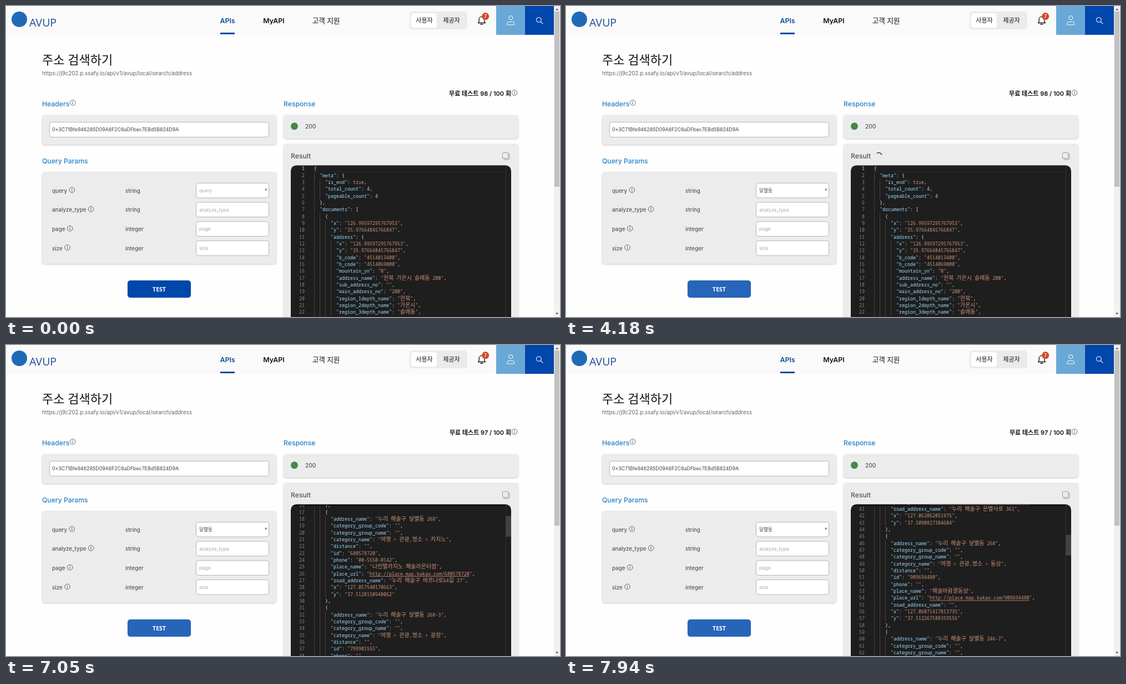
An HTML page with a canvas for the animation above (8.01 s loop, 998x561 px).

```html
<!DOCTYPE html>
<html lang="ko">
<head>
<meta charset="utf-8">
<title>주소 검색하기</title>
<style>
html, body { margin: 0; width: 100%; height: 100%; overflow: hidden; background: #fefefe; }
canvas { display: block; width: 998px; height: 561px; }
</style>
</head>
<body>
<canvas id="stage"></canvas>
<script>
const W = 998, H = 561, LOOP = 8010;
const canvas = document.getElementById('stage');
const dpr = window.devicePixelRatio || 1;
canvas.width = W * dpr;
canvas.height = H * dpr;
const c = canvas.getContext('2d');

const UI = "Inter, 'Noto Sans CJK KR', sans-serif";
const BOLD = "'Open Sans', 'Noto Sans', sans-serif";
const MONO = "8.33px 'Noto Sans Mono', monospace";
const HANGUL = "300 10px 'Noto Sans CJK KR', sans-serif";
const BLUE = '#0047ab';

// Timeline (ms)
const FOCUS = 860, HOVER = 2870, CLICK = 3180, ENTER = 5600, LOADED = 5990, LINKS = 6700;
const KEYS = [[1260, 'ㄷ'], [1400, '다'], [1470, '달'], [1670, '달ㅂ'], [1740, '달벼'],
  [1800, '달별'], [1870, '달별ㄷ'], [1990, '달별도'], [2080, '달별동']];
// Scroll position as [time, px], repainted every STEP ms
const SCROLL = [[6568, 0], [6636, 41.7], [7316, 287.2], [7384, 327], [7452, 327], [7928, 490.6]];
const STEP = 68;
const LINE = 12.33, TOP = 287.4;

const oldJson = {
  meta: { is_end: true, total_count: 4, pageable_count: 4 },
  documents: [{
    x: '126.99597295767953',
    y: '35.97664845766847',
    address: {
      x: '126.99597295767953',
      y: '35.97664845766847',
      b_code: '4514013400',
      h_code: '4514069000',
      mountain_yn: 'N',
      address_name: '한북 가온시 솔메동 200',
      sub_address_no: '',
      main_address_no: '200',
      region_1depth_name: '한북',
      region_2depth_name: '가온시',
      region_3depth_name: '솔메동',
      region_3depth_h_name: ''
    }
  }]
};

const place = (lot, kind, id, phone, name, road, x, y) => ({
  address_name: '누리 해솔구 달별동 ' + lot,
  category_group_code: '',
  category_group_name: '',
  category_name: '여행 > 관광,명소 > ' + kind,
  distance: '',
  id,
  phone,
  place_name: name,
  place_url: 'http://place.map.kakao.com/' + id,
  road_address_name: road && '누리 해솔구 ' + road,
  x, y
});
const newJson = {
  documents: [
    place('242', '문화유적 > 릉,묘,총', '26967382', '00-555-0187', '누리솔릉과별릉',
      '솔릉로200길 3', '127.04892851392', '37.5091105328378'),
    place('268', '카지노', '680578720', '00-5550-0142', '나인별카지노 해솔라온터점',
      '바르나로64길 27', '127.057540170663', '37.5120150940062'),
    place('268-3', '광장', '799901555', '', '라온터 동문광장',
      '은별사로 361', '127.062062051975', '37.5090827384604'),
    place('268', '동상', '909694480', '', '해솔바람결동상',
      '', '127.06071417813735', '37.512267588359556'),
    place('246-7', '', '', '', '', '', '', '')
  ]
};
const toLines = o => JSON.stringify(o, null, 2).split('\n');
const oldLines = toLines(oldJson), newLines = toLines(newJson);

const clamp = v => Math.max(0, Math.min(1, v));
const smooth = v => { v = clamp(v); return v * v * (3 - 2 * v); };
const mix = (a, b, k) => 'rgb(' + a.map((v, i) => Math.round(v + (b[i] - v) * k)) + ')';

function scrollAt(t) {
  const start = SCROLL[0][0];
  const held = start + Math.floor((t - start) / STEP) * STEP;
  let pos = 0;
  for (let i = 1; i < SCROLL.length; i++) {
    const [t0, a] = SCROLL[i - 1], [t1, b] = SCROLL[i];
    pos += (b - a) * clamp((held - t0) / (t1 - t0));
  }
  return pos;
}

function rect(x, y, w, h, fill) {
  c.fillStyle = fill;
  c.fillRect(x, y, w, h);
}
function box(x, y, w, h, r, fill, stroke) {
  c.beginPath();
  c.roundRect(x, y, w, h, r);
  if (fill) { c.fillStyle = fill; c.fill(); }
  if (stroke) { c.strokeStyle = stroke; c.lineWidth = 1; c.stroke(); }
}
function disc(x, y, r, fill) {
  c.beginPath();
  c.arc(x, y, r, 0, 7);
  c.fillStyle = fill;
  c.fill();
}
function stroke(d, color, w) {
  c.strokeStyle = color;
  c.lineWidth = w;
  c.stroke(new Path2D(d));
}
function text(s, x, y, size, color, weight = 400, align = 'left', family = UI) {
  c.font = `${weight} ${size}px ${family}`;
  c.fillStyle = color;
  c.textAlign = align;
  c.fillText(s, x, y);
  return c.measureText(s).width;
}
function card(x, y, w, h) {
  c.save();
  c.shadowColor = 'rgba(0,0,0,.2)';
  c.shadowBlur = 3 * dpr;
  c.shadowOffsetY = 1.3 * dpr;
  box(x, y, w, h, 5, '#ececec');
  c.restore();
}
function info(x, y) {
  c.beginPath();
  c.arc(x, y, 4.8, 0, 7);
  c.strokeStyle = '#47566a';
  c.lineWidth = 0.9;
  c.stroke();
  rect(x - 0.5, y - 0.8, 1, 3.4, '#47566a');
  rect(x - 0.5, y - 2.7, 1, 1.1, '#47566a');
}

function header() {
  rect(0, 0, 987, 52, '#fafafa');
  disc(24, 24, 14, '#1f6ab8');
  text('AVUP', 42, 37, 19.5, '#1c4f9c', 400, 'left', BOLD);
  text('APIs', 399, 31, 12.4, '#0b4a9e', 600, 'center');
  rect(386, 48, 26, 3, '#0b4a9e');
  text('MyAPI', 482.5, 31, 12.4, '#111', 600, 'center');
  text('고객 지원', 576.5, 31, 12.6, '#111', 500, 'center');

  box(727, 10, 104, 32, 5, '#ebebeb');
  box(730, 13, 46, 26, 4, '#fff');
  text('사용자', 753.5, 29.8, 11.1, '#111', 500, 'center');
  text('제공자', 802.5, 29.8, 11.1, '#111', 500, 'center');

  c.lineJoin = c.lineCap = 'round';
  stroke('M850.5 30.5H863.5L861.8 28V24A4.8 4.8 0 0 0 852.2 24V28ZM855 33H859', '#111', 1.3);
  disc(863.7, 18.6, 6.5, '#d5482f');
  text('7', 863.7, 21.6, 8.4, '#fff', 500, 'center');

  rect(883, 0, 52, 52, '#69a7d6');
  stroke('M905.6 21.2a3.6 3.6 0 1 0 7.2 0a3.6 3.6 0 1 0 -7.2 0M902.8 33.5V31.5A3 3 0 0 1 905.8 28.5H912.6A3 3 0 0 1 915.6 31.5V33.5Z', '#fff', 1);
  rect(935, 0, 52, 52, BLUE);
  stroke('M955.5 25a4.3 4.3 0 1 0 8.6 0a4.3 4.3 0 1 0 -8.6 0M963 28.3L967 32.2', '#fff', 1.1);
  c.lineJoin = 'miter';
  c.lineCap = 'butt';

  rect(987, 0, 11, H, '#f1f1f1');
  rect(988, 10, 9, 316, '#c1c1c1');
  c.fillStyle = '#555';
  c.fill(new Path2D('M990 7.5L992.6 4.2L995.2 7.5ZM990 553.5L992.6 556.8L995.2 553.5Z'));
}

function field(y, hint, value, border = '#b5b5b5') {
  box(342.5, y + 0.5, 131, 26.5, 4, '#fff', border);
  return text(value || hint, 348, y + 16.9, 8.67, value ? '#444' : '#aaa');
}

function form(t) {
  text('주소 검색하기', 65, 105.3, 22, '#111', 500);
  text('https://j9c202.p.ssafy.io/api/v1/avup/local/search/address', 65, 124.6, 9.8, '#666');
  text(`무료 테스트 ${t < LOADED ? 98 : 97} / 100 회`, 910, 162.2, 11, '#111', 600, 'right');
  info(916, 156.5);

  const label = '#2382cb';
  text('Headers', 65, 181.4, 12.2, label, 500);
  info(120.3, 174.5);
  card(65, 196.5, 422, 53.5);
  box(78.5, 209.5, 395, 27, 4, '#fff', '#b5b5b5');
  text('0×3C71Bfe946285D09A8F2C6aDFbec7EBd5B824D9A', 83, 226.2, 8.8, '#444');

  text('Query Params', 65, 283.8, 12.2, label, 500);
  card(65, 299, 422, 166);
  const rows = [['query', 'string', 118.8], ['analyze_type', 'string', 153],
    ['page', 'integer', 115.2], ['size', 'integer', 110.5]];
  const typed = KEYS.filter(k => t >= k[0]).pop();
  const value = typed ? typed[1] : '';
  const glow = smooth((t - FOCUS) / 150) * (1 - smooth((t - CLICK) / 150));
  rows.forEach(([name, type, ix], i) => {
    const y = 319 + i * 34.7;
    text(name, 83, y + 17.6, 9.75, '#555', 500);
    info(ix, y + 12.8);
    text(type, 215, y + 17.6, 9.75, '#555', 500);
    const w = field(y, name, i ? '' : value,
      i ? undefined : mix([181, 181, 181], [88, 172, 224], glow));
    if (i) return;
    text('*', 465.5, y + 18.2, 10.5, '#d8432b', 500);
    const since = t - (typed ? typed[0] : FOCUS);
    if (t >= FOCUS && t < CLICK && since % 1120 < 560)
      rect(Math.round(348 + (value ? w : 0)), 328, 1, 10, '#222');
  });

  c.save();
  c.shadowColor = 'rgba(0,0,0,.2)';
  c.shadowBlur = 2 * dpr;
  c.shadowOffsetY = dpr;
  box(219, 495, 114, 31, 5, mix([0, 71, 171], [38, 101, 186], smooth((t - HOVER) / 250)));
  c.restore();
  text('TEST', 276, 514.8, 10.5, '#fff', 700, 'center', BOLD);

  text('Response', 500, 181.4, 12.2, label, 500);
  card(500, 196.5, 423, 42.5);
  disc(519.5, 216.8, 6.5, '#418a49');
  text('200', 539, 220.6, 10.2, '#555', 500);
}

function code(s, x, y, color) {
  c.fillStyle = color;
  for (const run of s.match(/[가-힣]+|[^가-힣]+/g)) {
    c.font = run >= '가' ? HANGUL : MONO;
    c.fillText(run, x, y);
    x += c.measureText(run).width;
  }
  return x;
}

function codeLine(s, y, links) {
  const indent = s.search(/\S/);
  for (let i = 0; i < indent; i += 2) rect(555 + i * 5, y, 1, LINE, '#404040');
  let x = 555 + indent * 5;
  for (const tok of s.trim().match(/"[^"]*":?|[\w.]+|[^\w"]+/g)) {
    const base = y + 9;
    if (tok.endsWith('":')) {
      x = code(tok.slice(0, -1), x, base, '#9cdcfe');
      x = code(':', x, base, '#dcdcdc');
    } else {
      const color = /^["t]/.test(tok) ? '#ce9178' : /^\d/.test(tok) ? '#b5cea8' : '#dcdcdc';
      const start = x;
      x = code(tok, x, base, color);
      if (links && tok.startsWith('"http')) rect(start + 5, base + 1.3, x - start - 10, 0.8, color);
    }
  }
}

function result(t) {
  card(500, 248.5, 423, 330);
  text('Result', 513, 275, 12.2, '#555', 500);
  box(896.5, 266.5, 10.5, 10.5, 2, null, '#999');
  box(894.5, 264.5, 10.5, 10.5, 2, '#ececec', '#999');

  if (t >= CLICK && t < LOADED) {
    const mid = (276 + (t - 5900) * 0.36 - 90) * Math.PI / 180;
    c.beginPath();
    c.arc(563.2, 270.6, 6, mid - 0.94, mid + 0.94);
    c.strokeStyle = '#222';
    c.lineWidth = 1.3;
    c.stroke();
  }

  const loaded = t >= LOADED;
  const lines = loaded ? newLines : oldLines;
  const scroll = scrollAt(t);

  c.save();
  c.beginPath();
  c.roundRect(513, 287.4, 397, 300, 10);
  c.clip();
  rect(513, 287, 397, 275, '#1e1e1e');
  c.strokeStyle = '#2c2c2c';
  c.lineWidth = 1;
  c.strokeRect(555.5, TOP - scroll + 0.5, 345, LINE - 1);
  lines.forEach((s, i) => {
    const y = TOP + i * LINE - scroll;
    if (y < TOP - LINE || y > H) return;
    c.font = MONO;
    c.textAlign = 'right';
    c.fillStyle = i ? '#858585' : '#c6c6c6';
    c.fillText(i + 1, 538, y + 9);
    c.textAlign = 'left';
    codeLine(s, y, t >= LINKS);
  });
  if (scroll > 0) {
    const g = c.createLinearGradient(0, TOP, 0, TOP + 4);
    g.addColorStop(0, 'rgba(0,0,0,.8)');
    g.addColorStop(1, 'rgba(0,0,0,0)');
    rect(513, TOP, 388, 4, g);
  }
  rect(900, 287, 1, 275, '#363636');
  const shade = 0.4 * clamp((t - ENTER) / 100);
  rect(900.5, TOP + scroll * 0.1125, 9.5, loaded ? 37 : 197.5, `rgba(121,121,121,${shade})`);
  c.restore();
}

function draw(t) {
  c.setTransform(dpr, 0, 0, dpr, 0, 0);
  rect(0, 0, W, H, '#fefefe');
  form(t);
  result(t);
  header();
}

const begin = performance.now();
function tick() {
  draw((performance.now() - begin) % LOOP);
  requestAnimationFrame(tick);
}
tick();
</script>
</body>
</html>
```
